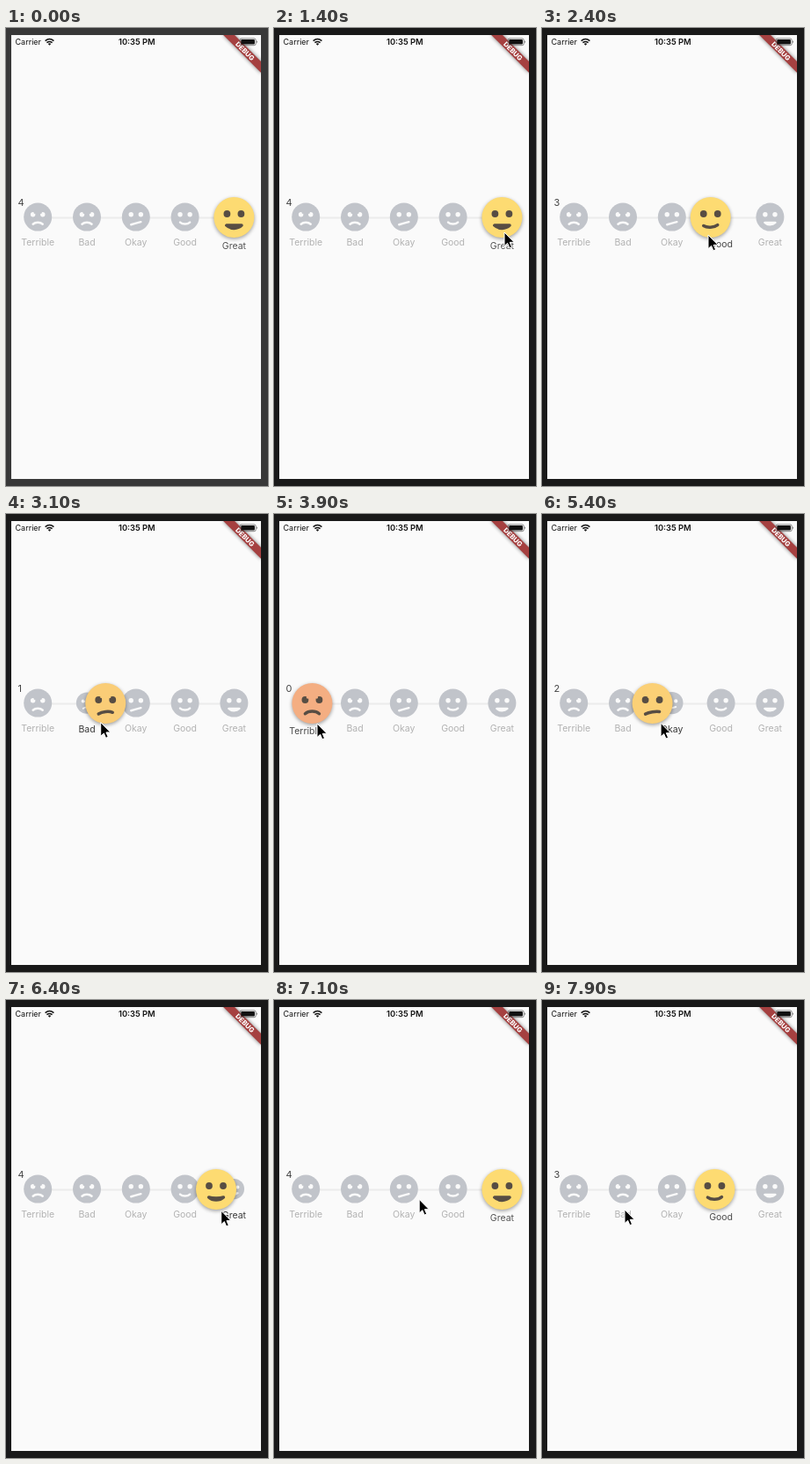
Animation, 298 px wide and 520 px high, one loop 8000 ms. Source, as an HTML page:

```html
<!DOCTYPE html>
<html lang="en">
<head>
<meta charset="utf-8">
<title>Review slider</title>
<style>
  html, body { margin: 0; width: 100%; height: 100%; overflow: hidden; background: #1a1a1a; }
  svg { display: block; width: 298px; height: 520px; font-family: Inter, Roboto, sans-serif; }
  #labels text { font-size: 10.5px; text-anchor: middle; }
</style>
</head>
<body>
<svg viewBox="0 0 298 520">
  <defs>
    <clipPath id="screen"><rect x="6" y="8" width="284" height="504"/></clipPath>
    <filter id="soft" x="-50%" y="-50%" width="200%" height="200%"><feGaussianBlur stdDeviation="2"/></filter>
  </defs>
  <rect id="frame" width="298" height="520"/>
  <rect x="6" y="8" width="284" height="504" fill="#fafafa"/>

  <g clip-path="url(#screen)">
    <g transform="translate(290 8) rotate(45)">
      <rect x="-30.3" y="21.2" width="60.6" height="9.1" opacity=".5" filter="url(#soft)"/>
      <rect x="-30.3" y="21.2" width="60.6" height="9.1" fill="#a54040"/>
      <text y="28.5" font-size="7.7" font-weight="800" fill="#fff" text-anchor="middle">DEBUG</text>
    </g>
  </g>

  <g fill="#111">
    <text x="10.5" y="19.2" font-size="9">Carrier</text>
    <text x="148.8" y="19.3" font-size="9.3" font-weight="600" text-anchor="middle">10:35 PM</text>
    <path d="M44.6 14.6Q49.5 10.6 54.4 14.6M46.4 16.7Q49.5 14.2 52.6 16.7" fill="none" stroke="#111" stroke-width="1.5"/>
    <path d="M47.7 17.9Q49.5 16.6 51.3 17.9L49.5 19.8Z"/>
    <rect x="266" y="11.9" width="18.2" height="7.8" rx="2" fill="none" stroke="#555" stroke-width=".7"/>
    <rect x="267.3" y="13" width="15.6" height="5.6" rx="1"/>
    <path d="M285 14.3q1.2 1.5 0 3z"/>
  </g>

  <text id="digit" x="13.5" y="202" font-size="11" fill="#444"></text>
  <rect x="36" y="214.5" width="224" height="2" fill="#ececec"/>
  <g id="faces"></g>
  <g id="labels"></g>
  <g id="head">
    <circle r="23" cy="1.5" opacity=".38" filter="url(#soft)"/>
  </g>
  <path id="cursor" d="M0 0V15.6L3.6 12.3L5.9 17.7L8.5 16.6L6.2 11.3H11.1Z" stroke="#fff" stroke-width="1"/>
</svg>
<script>
const LOOP = 8000, STEP = 100, LEFT = 36.2, GAP = 55.8, REACH = 28;
const NAMES = ["Terrible", "Bad", "Okay", "Good", "Great"];
const RIGHT = LEFT + GAP * 4;
const ENTER = 500, RELEASE = 6700, TAP = 7700, GLIDE = 480, LAG = 65;

// Pointer tip: time, x, y
const POINTER = [
  [ENTER, 302, 390], [1200, 262, 232], [1400, 262, 232],
  [2400, 189, 235], [3700, 38, 238], [3900, 49, 238],
  [5200, 112, 237], [6300, 239, 239], [RELEASE, 262, 240],
  [7200, 141, 223], [7300, 141, 223], [7400, 152, 224], [7600, 152, 224], [7800, 94, 238]
];

const $ = id => document.getElementById(id);
const mix = (a, b, k) => a + (b - a) * k;
const clamp = (v, lo = 0, hi = 1) => Math.min(hi, Math.max(lo, v));
const smooth = k => k * k * (3 - 2 * k);
const gray = v => `rgb(${v},${v},${v})`;

function set(el, attrs) {
  for (const k in attrs) el.setAttribute(k, attrs[k]);
  return el;
}
function make(tag, parent, attrs = {}) {
  return parent.appendChild(set(document.createElementNS("http://www.w3.org/2000/svg", tag), attrs));
}

function pointerAt(t) {
  const i = clamp(POINTER.findIndex(p => p[0] > t), -1, POINTER.length);
  if (i < 1) return POINTER[i < 0 ? POINTER.length - 1 : 0].slice(1);
  const [t0, x0, y0] = POINTER[i - 1], [t1, x1, y1] = POINTER[i], k = (t - t0) / (t1 - t0);
  return [mix(x0, x1, k), mix(y0, y1, k)];
}

// The head trails the pointer while dragged, then glides to a tapped spot
function headAt(t) {
  if (t > RELEASE) return mix(RIGHT, LEFT + GAP, smooth(clamp((t - TAP) / GLIDE)));
  return clamp(pointerAt(t - LAG)[0] - 2, LEFT, RIGHT);
}

function skinColor(mood) {
  const k = 1 - (1 - clamp(mood / 3)) ** 2;
  return `rgb(${mix(243, 253, k)},${mix(170, 219, k)},${mix(132, 114, k)})`;
}

function mouthPath(mood) {
  const open = clamp(mood - 3), bend = 3.7 * clamp(mood - 2, -1, 1);
  const w = 8 + 0.6 * open, mid = 11.7 - 1.5 * clamp(mood - 1, 0, 2) + 0.4 * open;
  const tilt = 2.2 * clamp(1 - Math.abs(mood - 2));
  const up = mid + bend * (1 - open), low = mid + bend + 0.7 * open;
  return `M${-w} ${mid + tilt}C-4 ${up + tilt / 2} 4 ${up - tilt / 2} ${w} ${mid - tilt}` +
    `C4 ${low - tilt / 2} -4 ${low + tilt / 2} ${-w} ${mid + tilt}Z`;
}

// A face of radius 23 around its own centre
function makeFace(parent, ink) {
  const skin = make("circle", parent, { r: 23 });
  const notches = [-1, 1].map(side => {
    make("circle", parent, { cx: 8 * side, cy: -4, r: 3.9, fill: ink });
    return make("circle", parent, { cx: 5.1 * side, cy: -6.9 });
  });
  const mouth = make("path", parent, { fill: ink, stroke: ink, "stroke-width": 3.5, "stroke-linejoin": "round" });
  return (mood, fill) => {
    set(skin, { fill });
    notches.forEach(n => set(n, { r: 1.6 * clamp(2 - mood), fill }));
    set(mouth, { d: mouthPath(mood) });
  };
}

const spots = NAMES.map((name, i) => {
  const x = LEFT + GAP * i, face = make("g", $("faces")), label = make("text", $("labels"), { x });
  makeFace(face, "#fafafa")(i, "#c1c4ca");
  label.textContent = name;
  return { x, face, label };
});
const paintHead = makeFace($("head"), "#574d43");

function draw(t) {
  const x = headAt(t), mood = (x - LEFT) / GAP, chosen = Math.round(mood);

  set($("frame"), { fill: gray(mix(56, 25, clamp((t - 400) / 400))) });
  $("digit").textContent = chosen;
  set($("head"), { transform: `translate(${x} 215)` });
  paintHead(mood, skinColor(mood));
  spots.forEach((s, i) => {
    // Spots shrink and labels sink as the head comes near
    const far = clamp(Math.abs(x - s.x) / REACH);
    set(s.face, { transform: `translate(${s.x} 214.6) scale(${far * 16 / 23})` });
    set(s.label, { y: 247.3 + 3.5 * (1 - far), fill: i === chosen ? gray(mix(84, 48, far)) : "#b2b2b2" });
  });
  set($("cursor"), { transform: `translate(${pointerAt(t)})`, visibility: t < ENTER ? "hidden" : "visible" });
}

const start = performance.now();
function tick() {
  const t = Math.max(0, performance.now() - start) % LOOP;
  draw(Math.floor(t / STEP) * STEP);
  requestAnimationFrame(tick);
}
tick();
</script>
</body>
</html>
```
